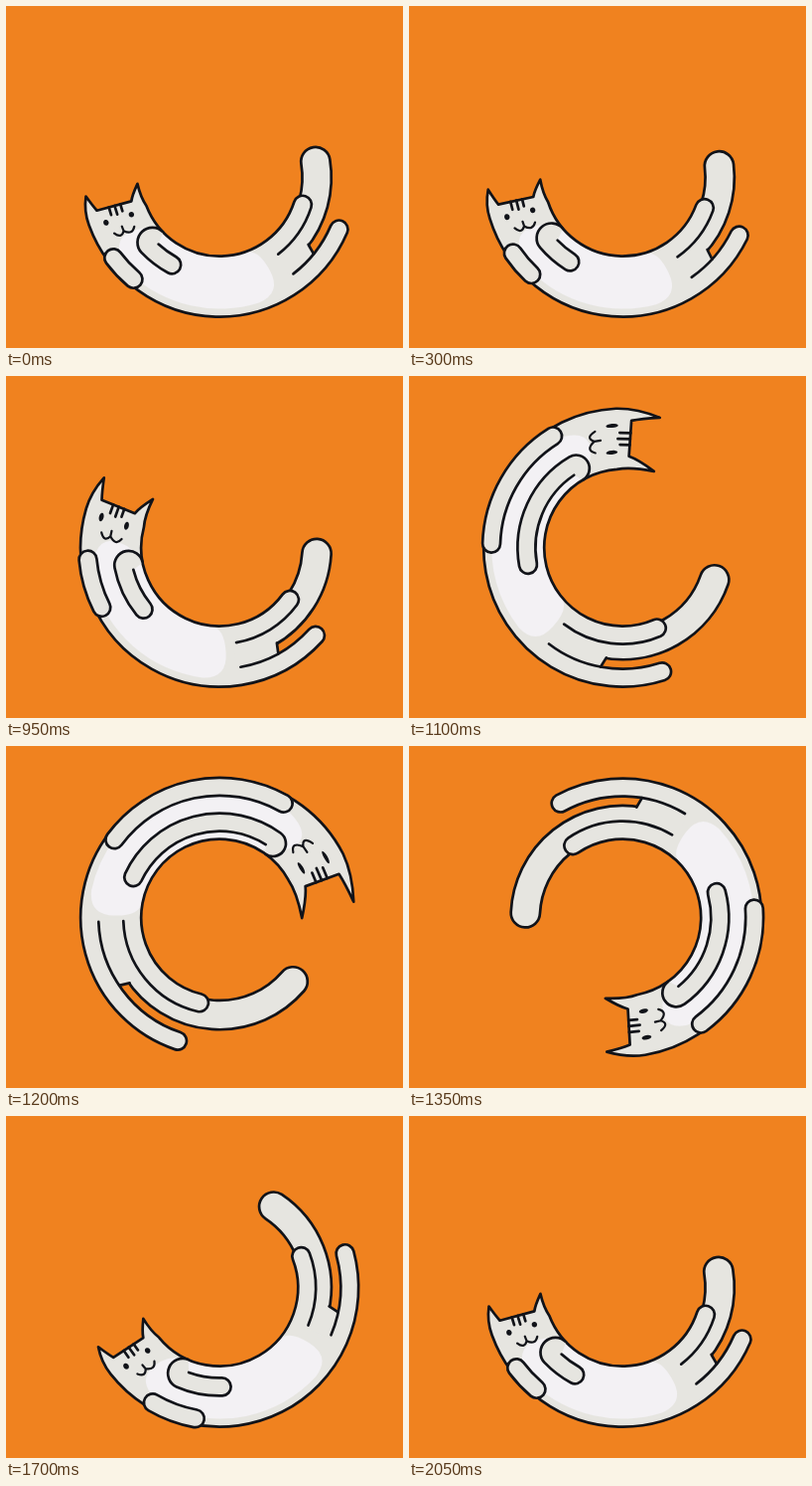
These frames come from a looping animation (400 px wide and 344 px high, 2100 ms). An HTML page:

```html
<!DOCTYPE html>
<html lang="en">
<head>
<meta charset="utf-8">
<title>Rolling cat</title>
<style>
  html, body { margin: 0; width: 100%; height: 100%; overflow: hidden; background: #f0821f; }
  svg { display: block; width: 100%; height: 100%; }
  path { fill: none; stroke-linecap: round; stroke-linejoin: round; }
  .fur { fill: #e6e5e0; }
  .belly { fill: #f3f1f4; }
  .ink { stroke: #111319; stroke-width: 2.7; }
  .solid { fill: #111319; }
  .outer { stroke: #111319; }
  .inner { stroke: #e6e5e0; }
</style>
</head>
<body>
<svg viewBox="0 0 400 344">
  <path id="tailEdge" class="outer" stroke-width="32"/>
  <path id="tail" class="inner" stroke-width="26.6"/>
  <path id="bodyFill" class="fur"/>
  <path id="rump" class="fur"/>
  <path id="belly" class="belly"/>
  <path id="notch" class="ink"/>
  <path id="body" class="ink"/>
  <path id="eyes" class="solid"/>
  <path id="stripes" class="ink"/>
  <path id="mouth" class="ink" style="stroke-width:2.2"/>
  <path id="innerArm" class="fur ink"/>
  <path id="armEdge" class="outer" stroke-width="20.6"/>
  <path id="arm" class="inner" stroke-width="15.2"/>
</svg>
<script>
const LOOP = 2100, STEP = 50, CX = 215.2, CY = 172.6;
const times = [0, 600, 950, 1200, 1450, 1700, 2050, 2100];

// Angles in degrees around the ring; every part makes one full turn per loop.
const turn = (...v) => [...v, v[0] + 360, v[0] + 360];
const tracks = {
  head:     turn(165, 174.7, 202, 340, 490, 506.7),
  shoulder: turn(143, 151.4, 174.8, 299.3, 462, 480.2),
  hand:     turn(130.3, 139.7, 153.1, 216.5, 429.5, 460.5),
  elbow:    turn(132.6, 144, 165.6, 302.3, 454.7, 470),
  hand2:    turn(118.6, 128.6, 141, 204.9, 418.3, 448.5),
  hip:      turn(52.5, 61.5, 80, 178, 358.5, 383),
  crotch:   turn(38, 48, 60, 145, 343.6, 370.7),
  foot:     turn(23.3, 32.1, 42.4, 108.8, 311.4, 344.8),
  foot2:    turn(18, 25, 36.5, 103.3, 305.3, 339),
  tail:     turn(-9.4, -2.3, 3.5, 41, 265, 303.8),
  stretch:  [1, 1.02, 1.15, 1.45, 1.07, 1.02, 1, 1]
};

// Monotone cubic interpolation
function sample(v, t) {
  const gap = i => times[i + 1] - times[i];
  const rate = i => (v[i + 1] - v[i]) / gap(i);
  const slope = i => {
    if (i === 0 || i === times.length - 1) return 0;
    const a = rate(i - 1), b = rate(i);
    return a * b <= 0 ? 0 : 2 * a * b / (a + b);
  };
  let i = 0;
  while (t >= times[i + 1]) i++;
  const h = gap(i), u = (t - times[i]) / h, w = 1 - u;
  return v[i] * w * w * (1 + 2 * u) + v[i + 1] * u * u * (3 - 2 * u)
    + h * u * w * (slope(i) * w - slope(i + 1) * u);
}

const pt = (r, a) => {
  const rad = a * Math.PI / 180;
  return (CX + r * Math.cos(rad)).toFixed(2) + ' ' + (CY + r * Math.sin(rad)).toFixed(2);
};
const move = (r, a) => 'M' + pt(r, a);
const line = (r, a) => 'L' + pt(r, a);
const quad = (r1, a1, r, a) => 'Q' + pt(r1, a1) + ' ' + pt(r, a);
const arc = (r, from, to) =>
  `A${r} ${r} 0 ${+(Math.abs(to - from) > 180)} ${+(to > from)} ${pt(r, to)}`;
const cap = (size, r, a) => `A${size} ${size} 0 0 1 ${pt(r, a)}`;
const band = (r, from, to) => move(r, from) + arc(r, from, to);

function eye(r, a, width, height) {
  let d = '';
  for (let i = 0; i < 16; i++) {
    const q = i * Math.PI / 8;
    d += (i ? 'L' : 'M') + pt(r + width * Math.cos(q), a + height * Math.sin(q));
  }
  return d + 'Z';
}

const set = (id, d) => document.getElementById(id).setAttribute('d', d);

function draw(t) {
  const p = {};
  for (const name in tracks) p[name] = sample(tracks[name], t);
  const k = p.stretch, ear = 2 * k - 1, H = p.head;
  const at = d => H + d * k;
  const tip = d => H + d * ear;

  const tail = band(98, p.crotch + 2, p.tail);
  set('tailEdge', tail);
  set('tail', tail);

  const body = band(122, p.hip, p.foot) + cap(9, 140, p.foot)
    + arc(140, p.foot, at(-5))
    + quad(141, tip(1), 136, tip(7)) + quad(131, tip(2.5), 128, H)
    + line(92, H)
    + quad(90, tip(3.5), 83, tip(10.7)) + quad(82, tip(1), 79, at(-6))
    + arc(79, at(-6), p.foot2) + cap(9, 97, p.foot2) + arc(97, p.foot2, p.hip);
  set('body', body);
  set('bodyFill', body + 'Z');

  const low = p.crotch - 1, high = p.crotch + 1, back = p.hip + 2;
  set('rump', band(96, back, low) + line(112, low) + line(122, high) + arc(122, high, back) + 'Z');
  set('notch', move(112, low) + line(122, high));

  const end = p.hip + 19 / k - 10;
  set('belly', move(110, at(-16)) + quad(130, at(-17), 132, at(-32))
    + arc(132, at(-32), end + 11) + quad(132, end, 106, end) + quad(80, end, 80, end + 10)
    + arc(80, end + 10, at(-32)) + quad(84, at(-17), 110, at(-16)) + 'Z');

  const height = 1.4 * (3 * k - 2), width = 2.7 / k;
  set('eyes', eye(123, at(-6.6), width, height) + eye(96.3, at(-7.7), width, height * 1.2));

  const stripe = (r, d) => move(r, H) + line(r, at(d));
  set('stripes', stripe(115.5, -4) + stripe(109.5, -4.8) + stripe(103.5, -4));
  set('mouth', move(110, at(-11.5)) + line(110.5, at(-14))
    + move(120, at(-12.8)) + quad(116.5, at(-17), 110.5, at(-14))
    + quad(105, at(-18.5), 99, at(-14.8)));

  const shift = (k - 1) * 9;
  const top = 91 - shift, bottom = 109 - shift, round = p.elbow + 3.5;
  set('innerArm', band(top, p.elbow, p.hand2) + cap(9, bottom, p.hand2)
    + arc(bottom, p.hand2, round) + cap((bottom - 79) / 2, 79, round));

  const arm = band(134 - (k - 1) * 5, p.shoulder, p.hand);
  set('armEdge', arm);
  set('arm', arm);
}

const start = performance.now();
function tick() {
  const t = (performance.now() - start) % LOOP;
  draw(Math.floor(t / STEP) * STEP);
  requestAnimationFrame(tick);
}
tick();
</script>
</body>
</html>
```
